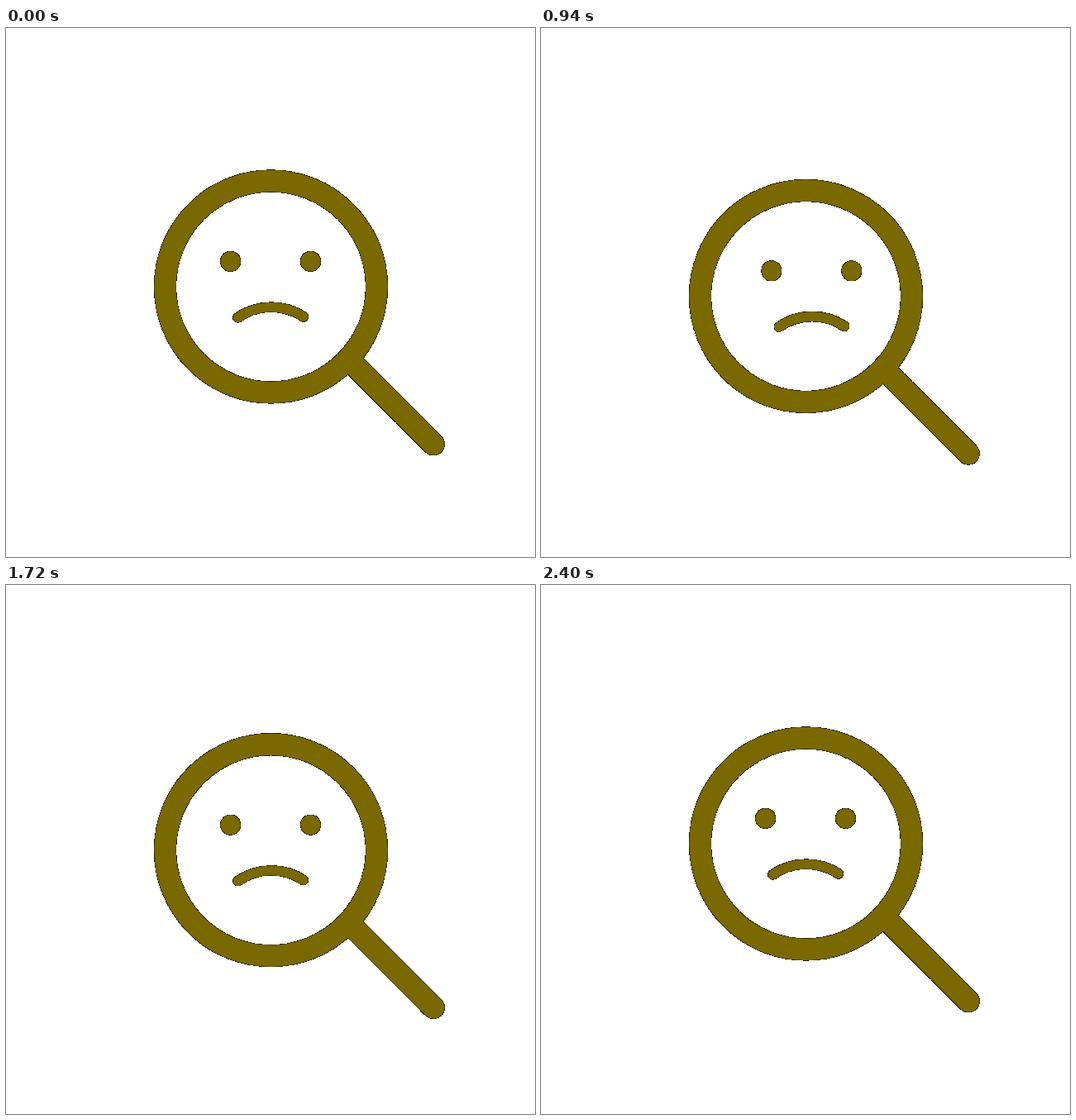
An HTML page that plays this animation: 640x640 px, repeating every 2.42 s.

```html
<!DOCTYPE html>
<html lang="en">
<head>
<meta charset="utf-8">
<title>Sad magnifier</title>
<style>
  html, body { margin: 0; width: 100%; height: 100%; overflow: hidden; background: #fff; }
  svg { display: block; width: 100%; height: 100%; }
</style>
</head>
<body>
<svg viewBox="0 0 640 640">
  <!-- Hard dark rim: every partly covered pixel is blended onto black -->
  <filter id="rim" filterUnits="userSpaceOnUse" x="0" y="0" width="640" height="640" color-interpolation-filters="sRGB">
    <feComponentTransfer in="SourceAlpha" result="mask">
      <feFuncA type="linear" slope="255"/>
    </feComponentTransfer>
    <feComposite in="SourceGraphic" in2="mask" operator="atop"/>
  </filter>
  <g filter="url(#rim)">
    <g id="glass" fill="none" stroke="#7a6800" stroke-linecap="round">
      <circle cx="320.5" cy="313" r="128" stroke-width="26.4"/>
      <path d="M420 406.3L517.1 503.4" stroke-width="26.8"/>
      <g id="face">
        <circle cx="271.6" cy="282.4" r="12.1" fill="#7a6800" stroke="none"/>
        <circle cx="368.5" cy="282.4" r="12.1" fill="#7a6800" stroke="none"/>
        <path d="M280.6 350.3A70.5 70.5 0 0 1 359.8 349.3" stroke-width="11.9"/>
      </g>
    </g>
  </g>
</svg>
<script>
  const LOOP = 2420, STEP = 20;
  const bob = [[0, 0], [1200, 13], [2400, 0]];
  const glance = [[600, 0], [1040, 8.4], [1560, 0]];
  const glass = document.getElementById('glass');
  const face = document.getElementById('face');

  const ease = u => u * u * (3 - 2 * u);

  function valueAt(keys, t) {
    if (t <= keys[0][0]) return keys[0][1];
    for (let i = 1; i < keys.length; i++) {
      const [t0, a] = keys[i - 1], [t1, b] = keys[i];
      if (t < t1) return a + (b - a) * ease((t - t0) / (t1 - t0));
    }
    return keys[keys.length - 1][1];
  }

  const start = performance.now();

  function draw(now) {
    const elapsed = Math.max(0, now - start) % LOOP;
    const t = Math.floor(elapsed / STEP) * STEP;
    glass.setAttribute('transform', `translate(0 ${valueAt(bob, t)})`);
    face.setAttribute('transform', `translate(${valueAt(glance, t)} 0)`);
    requestAnimationFrame(draw);
  }
  draw(start);
</script>
</body>
</html>
```
